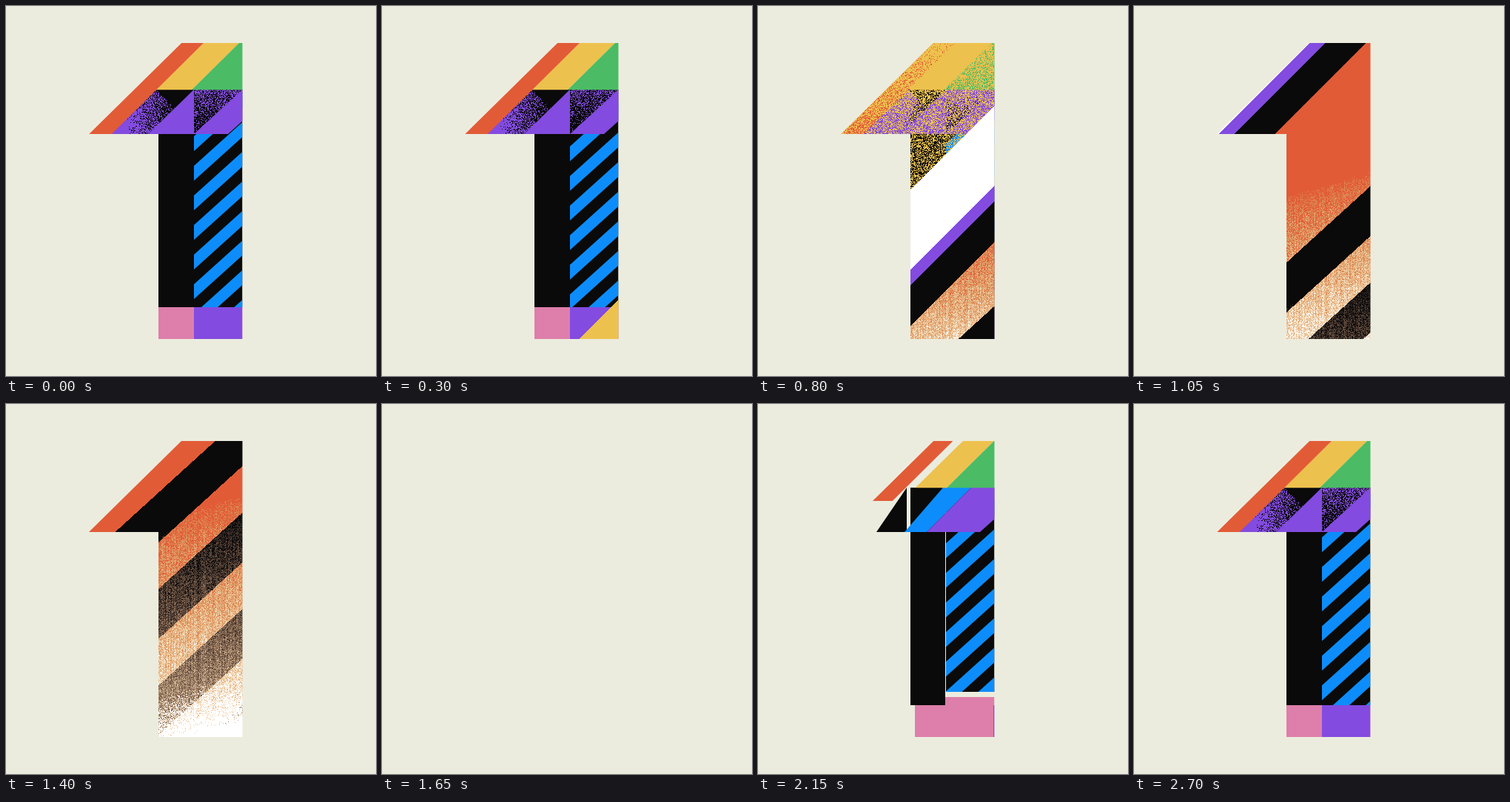
These frames come from a looping animation (500 px wide and 500 px high, 2.75 s). An HTML page with a canvas:

```html
<!DOCTYPE html>
<html lang="en">
<head>
<meta charset="utf-8">
<title>One</title>
<style>
  html, body { margin: 0; width: 100%; height: 100%; overflow: hidden; background: #ebecde; }
  canvas { display: block; width: 500px; height: 500px; }
</style>
</head>
<body>
<canvas id="stage" width="500" height="500"></canvas>
<script>
const LOOP = 2750, STEP = 50, SIZE = 500;
const C = {
  bg: '#ebecde', orange: '#e25b37', yellow: '#edc14d', green: '#4bbb65',
  purple: '#834bdf', black: '#0a0a0a', blue: '#0d8dfb', pink: '#de7eaa',
  white: '#ffffff', cream: '#f0d3ae', tan: '#e3ae78', rust: '#dc8550',
  soot: '#3a2c26', umber: '#6b5242', mocha: '#9c7d62', sand: '#cfb393',
  taupe: '#c9b4a8'
};
const WARM = ['orange', 'rust', 'tan', 'cream', 'white'];
const DARK = ['black', 'soot', 'umber', 'mocha', 'sand'];
const RGB = {};
for (const n in C) RGB[n] = [1, 3, 5].map(i => parseInt(C[n].slice(i, i + 2), 16));

const ctx = document.getElementById('stage').getContext('2d');
const layer = document.createElement('canvas');
layer.width = layer.height = SIZE;
const lctx = layer.getContext('2d');

// Seeded grain
const grain = new Float32Array(SIZE * SIZE);
let seed = 7;
for (let i = 0; i < grain.length; i++) {
  seed = (Math.imul(seed, 1664525) + 1013904223) >>> 0;
  grain[i] = seed / 4294967296;
}
const noise = (x, y) => grain[y * SIZE + x];
const noise2 = (x, y) => grain[(SIZE - 1 - y) * SIZE + x];
const streak = x => grain[x * 37] - 0.5;

const clamp = v => Math.max(0, Math.min(1, v));
// Eased value from a flat list of time, value pairs
function key(t, ...k) {
  if (t <= k[0]) return k[1];
  for (let i = 2; i < k.length; i += 2) {
    if (t < k[i]) {
      const u = 1 - (t - k[i - 2]) / (k[i] - k[i - 2]);
      return k[i - 1] + (k[i + 1] - k[i - 1]) * (1 - u * u);
    }
  }
  return k[k.length - 1];
}

function trace(p) {
  ctx.beginPath();
  for (let i = 0; i < p.length; i += 2) ctx.lineTo(p[i], p[i + 1]);
  ctx.closePath();
}
function poly(color, ...p) {
  trace(p);
  ctx.fillStyle = C[color];
  ctx.fill();
}
function within(p, draw) {
  ctx.save();
  trace(p);
  ctx.clip();
  draw();
  ctx.restore();
}
function rect(color, x0, y0, x1, y1) {
  if (x1 <= x0 || y1 <= y0) return;
  ctx.fillStyle = C[color];
  ctx.fillRect(x0, y0, x1 - x0, y1 - y0);
}
// Paints each pixel of a box with the colour name that pick returns
function dots(x0, y0, w, h, pick) {
  const img = lctx.createImageData(w, h), d = img.data;
  for (let y = 0, i = 0; y < h; y++) {
    for (let x = 0; x < w; x++, i += 4) {
      const name = pick(x + x0, y + y0);
      if (!name) continue;
      const c = RGB[name];
      d[i] = c[0]; d[i + 1] = c[1]; d[i + 2] = c[2]; d[i + 3] = 255;
    }
  }
  lctx.clearRect(0, 0, SIZE, SIZE);
  lctx.putImageData(img, 0, 0);
  ctx.drawImage(layer, 0, 0, w, h, x0, y0, w, h);
}
// Grainy step along a ramp of colours, u from 0 to 1
function shade(ramp, u, x, y) {
  const jitter = (noise(x, y) - 0.5) * 2.4 + streak(x) * 0.9;
  const i = Math.round(u * 4 + jitter * clamp(u * 6));
  return ramp[Math.max(0, Math.min(4, i))];
}

function stripes(t, top, bottom) {
  if (top >= bottom) return;
  within([254, top, 319.5, top, 319.5, bottom, 254, bottom], () => {
    rect('black', 254, top, 320, bottom);
    const low = (196 - t * 240 / LOOP) % 40;
    for (let y = low + 80; y < 540; y += 40)
      poly('blue', 254, y - 20, 320, y - 79.5, 320, y - 59.5, 254, y);
  });
}

function settledNeck(t) {
  const extra = t < 700 ? 0.13 * t / 550 : 0;
  poly('black', 200, 113, 254, 113, 228, 140);
  within([203, 113, 228, 138, 192, 173, 138, 173], () =>
    dots(138, 113, 92, 60, (x, y) => {
      const p = clamp((x + (y - 143) * 0.15 - 164) / 72 + extra * clamp((x - 145) / 20));
      return noise(x, y) < p ? 'black' : 'purple';
    }));
  poly('purple', 254, 113, 254, 173, 192, 173);
  within([254, 113, 319.5, 113, 254, 173], () =>
    dots(254, 113, 66, 60, (x, y) => {
      const p = 0.42 + 0.5 * (y - 113) / 60 + extra;
      return noise(x, y) < p ? 'black' : 'purple';
    }));
}

function slidingNeck(t) {
  const right = key(t, 1800, 140, 1900, 174, 2150, 201);
  const left = key(t, 1800, 140, 1900, 149, 2150, 160);
  const apex = key(t, 1800, 173, 1900, 146, 2150, 113);
  if (t > 1800) poly(t < 2000 ? 'blue' : 'black', left, 173, right, apex, right, 173);
  const s = key(t, 1950, 130, 2150, 0);
  if (t <= 1950) return;
  poly('blue', 250 + s, 113, 288 + s, 113, 228 + s, 173, 198 + s, 173);
  poly('purple', 288 + s, 113, 320 + s, 113, 320 + s, 155, 300 + s, 173, 228 + s, 173);
}

function ball(t) {
  const x = key(t, 1700, 385, 1900, 284, 2000, 276);
  const fade = clamp((t - 1900) / 150);
  if (t <= 1700 || fade >= 1) return;
  ctx.save();
  ctx.beginPath();
  ctx.arc(x, 119, 53, 0, 7);
  ctx.clip();
  dots(225, 66, 96, 107, (px, py) => {
    if (noise2(px, py) < fade) return null;
    const p = clamp(((px - x) * 0.6 + (py - 119) + 62) / 140);
    if (noise(px, py) > p) return 'black';
    return noise2(px, py) < 0.6 ? 'taupe' : 'cream';
  });
  ctx.restore();
}

function figure(t, now) {
  if (t < 1950) {
    ctx.strokeStyle = '#efc39c';
    ctx.lineWidth = 1;
    ctx.beginPath();
    ctx.moveTo(112, 173); ctx.lineTo(140, 145);
    ctx.moveTo(206.5, 173); ctx.lineTo(206.5, 262);
    ctx.stroke();
  }
  ball(t);

  const pinkLeft = key(t, 1950, 320, 2150, 212, 2300, 206);
  rect('pink', pinkLeft, key(t, 2150, 396, 2400, 407), 319.5, 450);
  rect('purple', key(t, 2130, 319.5, 2150, 318, 2450, 254), 407, 319.5, 450);

  stripes(now, key(t, 1850, 450, 1900, 412, 2150, 113),
    key(t, 1920, 450, 2150, 389, 2450, 407));

  const bar = key(t, 1700, 320, 1900, 225, 2150, 206);
  rect('black', bar, 113, bar + key(t, 2150, 47, 2350, 48), 407);

  slidingNeck(t);
  const wipe = key(t, 2200, 500, 2500, 245);
  if (wipe < 500) within([wipe - 50, 50, 700, 50, 700, 250, wipe - 250, 250], () => settledNeck(now));

  const y = key(t, 1950, 385, 2150, 277, 2400, 267);
  const g = key(t, 1950, 423, 2150, 319, 2400, 315);
  poly('yellow', y, 50, g, 50, g - 64, 113.3, y - 64.5, 113.3);
  poly('green', g, 50, 500, 50, 500, 113.3, g - 64, 113.3);

  const end = key(t, 1950, 50, 2150, 131, 2450, 173), d = end - 50;
  const w = key(t, 2150, 26.5, 2400, 30);
  if (d > 0) poly('orange', 237, 50, 237 + w, 50, 237 + w - d * 1.01, end, 237 - d * 1.016, end);
}

// Diagonal sheets that sweep up over the figure
function sheets(t) {
  const yellow = 441 - 1.1 * (t - 550);
  const white = 729 - 1.1 * (t - 550);
  const purple = 287 - 1.1 * (t - 1050);
  const dt = t - 1050;
  const band = 243 - 0.6486 * dt;
  const warm = 230 - 0.3 * dt, warmLen = 260 + 0.2 * dt;
  const wear = 375 - 0.65 * dt;
  const bleach = 380 - 1.7 * (t - 1400), clear = 470 - 2 * (t - 1400);

  dots(112, 50, 208, 400, (x, y) => {
    const sum = x + y, n = noise(x, y), tilt = y + 0.3 * (x - 262);
    if (sum < yellow) return null;
    if (sum < white) {
      const fade = clamp((tilt - 308 + 1.1 * (t - 550)) / 95);
      return n < 1 - 0.52 * fade ? 'yellow' : null;
    }
    if (sum < purple) return 'white';
    if (sum < purple + 21) return 'purple';
    if (sum < purple + 76) return 'black';

    if (n < (tilt - clear) / 70) return 'bg';
    if (noise2(x, y) < (tilt - bleach) / 65) return 'white';
    const edge = y + (x - 319) * 0.91 - band;
    return edge >= 0 && edge % 130.3 < 67.4
      ? shade(DARK, clamp((tilt - wear) / 300), x, y)
      : shade(WARM, clamp((tilt - warm) / warmLen), x, y);
  });
}

function draw(t) {
  ctx.fillStyle = C.bg;
  ctx.fillRect(0, 0, SIZE, SIZE);
  within([237, 50, 319.5, 50, 319.5, 450, 206, 450, 206, 173, 112, 173], () => {
    if (t < 1000) figure(LOOP, t);
    else if (t >= 1700) figure(t, t);
    if (t > 100 && t < 1700) sheets(t);
  });
}

const start = performance.now();
let shown = -1;
function tick() {
  const t = Math.floor((performance.now() - start) % LOOP / STEP) * STEP;
  if (t !== shown) draw(shown = t);
  requestAnimationFrame(tick);
}
tick();
</script>
</body>
</html>
```
